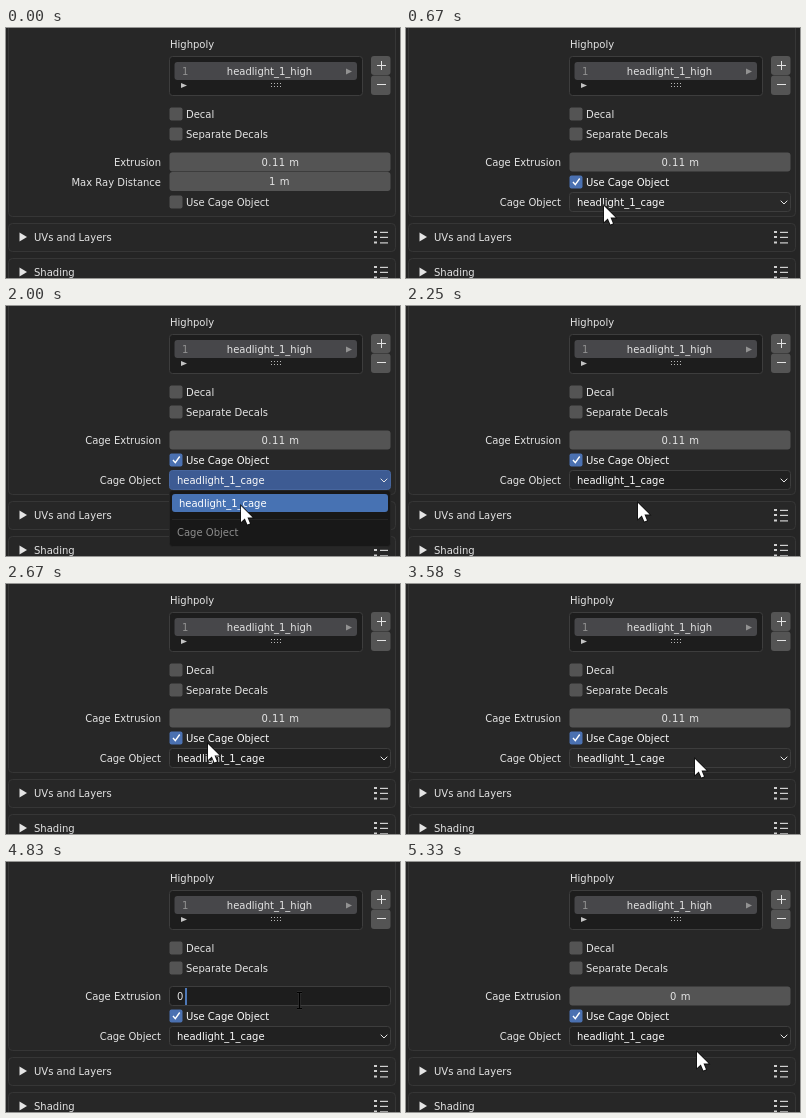
An HTML page with a canvas for the animation above (5.51 s loop, 394x250 px).

```html
<!DOCTYPE html>
<html lang="en">
<head>
<meta charset="utf-8">
<title>Cage settings</title>
<style>
html, body { margin: 0; width: 100%; height: 100%; overflow: hidden; background: #252525; }
canvas { display: block; }
</style>
</head>
<body>
<canvas id="stage" width="394" height="250"></canvas>
<script>
const ctx = document.getElementById('stage').getContext('2d');
const LOOP = 5510, STEP = 1000 / 12;
const TEXT = '#e4e4e4', BRIGHT = '#fafafa', FIELD = '#545454', HOVER = '#626262';
const PANEL = '#272727', GAP = '#252525', RIM = '#363636', DARK = '#1d1d1d', EDGE = '#3d3d3d', BLUE = '#4772b3';

// Steps (12 per second) at which the interface changes
const TICK = 6, OPEN = 18, CLOSE = 27, EDIT = 50, TYPE = 53, COMMIT = 60;

// Pointer path: step, x, y
const PATH = [
  [3, 196, 244], [6, 198, 181], [8, 198, 178], [13, 206, 177], [17, 221, 177],
  [20, 224, 179], [24, 235, 200], [27, 232, 197], [32, 202, 160], [35, 260, 192],
  [37, 290, 189], [42, 290, 189], [43, 289, 175], [49, 293, 139], [60, 293, 139], [64, 291, 190]
];

function pointerAt(step) {
  let i = 0;
  while (i < PATH.length - 2 && step > PATH[i + 1][0]) i++;
  const [s0, x0, y0] = PATH[i], [s1, x1, y1] = PATH[i + 1];
  const u = Math.max(0, Math.min(1, (step - s0) / (s1 - s0)));
  const e = u * u * (3 - 2 * u);
  return [x0 + (x1 - x0) * e, y0 + (y1 - y0) * e];
}

function box(x, y, w, h, fill, edge, radius = 3) {
  ctx.beginPath();
  if (edge) ctx.roundRect(x + .5, y + .5, w - 1, h - 1, radius);
  else ctx.roundRect(x, y, w, h, radius);
  ctx.fillStyle = fill;
  ctx.fill();
  if (edge) line(edge);
}

function line(color, width = 1) {
  ctx.strokeStyle = color;
  ctx.lineWidth = width;
  ctx.stroke();
}

function poly(points, x = 0, y = 0) {
  ctx.beginPath();
  points.forEach(([px, py]) => ctx.lineTo(x + px, y + py));
}

function label(text, x, y, align = 'left', color = TEXT, spacing = 0) {
  ctx.font = '10px "DejaVu Sans", sans-serif';
  ctx.letterSpacing = spacing + 'px';
  ctx.textAlign = align;
  ctx.fillStyle = color;
  ctx.fillText(text, x, y);
}

const value = (text, x, y, align) => label(text, x, y, align, TEXT, .5);

function triangle(x, y, w, h, color) {
  poly([[0, -h / 2], [w, 0], [0, h / 2]], x, y);
  ctx.closePath();
  ctx.fillStyle = color;
  ctx.fill();
}

function checkbox(text, y, on) {
  box(163.5, y - 6.5, 13, 13, on ? '#4b71b1' : FIELD, null, 2);
  if (on) {
    poly([[167, 0], [169.3, 2.7], [173.7, -3.5]], 0, y);
    line('#fff', 1.4);
  }
  label(text, 180, y + 4, 'left', on ? BRIGHT : TEXT);
}

function section(title, y) {
  box(2, y - 14, 388, 29, PANEL, RIM, 4);
  triangle(13.5, y, 7.5, 9, TEXT);
  label(title, 28, y + 4);
  ctx.fillStyle = '#d0d0d0';
  for (const dy of [-5, 0, 5.5]) {
    ctx.fillRect(368, y + dy - 1, 3, 2);
    ctx.fillRect(374, y + dy - .2, 8, 1.2);
  }
}

function highpolyList() {
  label('Highpoly', 164, 20);
  box(163, 28, 194, 40, DARK, EDGE);
  box(168.5, 34, 182.5, 18, '#47474a');
  label('1', 176, 47, 'left', '#929292');
  label('headlight_1_high', 263.5, 47, 'center');
  triangle(340, 43.5, 6, 6, '#929292');
  triangle(175, 57.5, 6, 5, '#c4c4c4');
  ctx.fillStyle = '#b8b8b8';
  for (let x = 265; x < 277; x += 3) {
    ctx.fillRect(x, 55, 1, 1);
    ctx.fillRect(x, 58, 1, 1);
  }
  box(365, 28, 19.5, 19, FIELD);
  box(365, 47.5, 19.5, 19.5, FIELD);
  ctx.fillStyle = TEXT;
  ctx.fillRect(371, 37, 9, 1);
  ctx.fillRect(375, 33, 1, 9);
  ctx.fillRect(371, 56, 9, 1);
}

function extrusionField(step, hovered) {
  if (step < EDIT || step >= COMMIT) {
    box(163.5, 124.5, 221, 19, hovered ? HOVER : FIELD);
    value(step < EDIT ? '0.11 m' : '0 m', 274.5, 138, 'center');
    return;
  }
  box(163, 124, 222, 20, DARK, EDGE);
  ctx.fillStyle = '#4d78b7';
  if (step < TYPE) ctx.fillRect(170.5, 125, 39, 18.5);
  else ctx.fillRect(179, 126, 2, 17);
  value(step < TYPE ? '0.11 m' : '0', 171, 138);
}

function cageField(open, hovered) {
  label('Cage Object', 155, 178, 'right');
  box(163, 164, 222, 20, open ? '#3d5b93' : hovered ? '#292929' : '#212121', open ? '#46659d' : EDGE);
  label('headlight_1_cage', 171, 178, 'left', BRIGHT);
  poly([[374.7, 172.7], [378, 176], [381.3, 172.7]]);
  line(TEXT);
}

function cageMenu() {
  box(163, 184, 222, 57, '#181818', '#242424');
  box(166, 188, 216, 18, BLUE);
  label('headlight_1_cage', 173, 201, 'left', '#fff');
  ctx.fillStyle = '#262626';
  ctx.fillRect(166, 213, 216, 1);
  label('Cage Object', 171, 230, 'left', '#8c8c8c');
}

function arrow(x, y) {
  poly([[0, 0], [0, 16], [3.8, 12.6], [6.4, 18.6], [9, 17.5], [6.5, 11.6], [11.6, 11.6]], x, y);
  ctx.closePath();
  line('#111', 1.6);
  ctx.fillStyle = '#fff';
  ctx.fill();
}

function textCursor(x, y) {
  poly([[-2.5, -8], [2.5, -8], [0, -8], [0, 8], [-2.5, 8], [2.5, 8]], x + .5, y - .5);
  line('#303030', 2.4);
  line('#000');
}

function draw(step) {
  const [x, y] = pointerAt(step);
  const caged = step >= TICK, open = step >= OPEN && step < CLOSE;
  const over = top => caged && y > top && y < top + 19;

  ctx.fillStyle = GAP;
  ctx.fillRect(0, 0, 394, 250);
  box(2, -10, 388, 199, PANEL, RIM, 4);
  section('UVs and Layers', 209);
  section('Shading', 244);
  highpolyList();
  checkbox('Decal', 86);
  checkbox('Separate Decals', 106);

  label(caged ? 'Cage Extrusion' : 'Extrusion', 155, 138, 'right');
  extrusionField(step, over(125));
  if (caged) {
    checkbox('Use Cage Object', 154, true);
    cageField(open, over(165));
  } else {
    label('Max Ray Distance', 155, 158, 'right');
    box(163.5, 144, 221, 19, FIELD);
    value('1 m', 273.5, 157, 'center');
    checkbox('Use Cage Object', 174);
  }
  if (open) cageMenu();

  if (step >= EDIT && step < COMMIT) textCursor(x, y);
  else if (step >= PATH[0][0]) arrow(x, y);
}

function tick() {
  draw(Math.floor((performance.now() % LOOP + 4) / STEP));
  requestAnimationFrame(tick);
}
tick();
</script>
</body>
</html>
```
